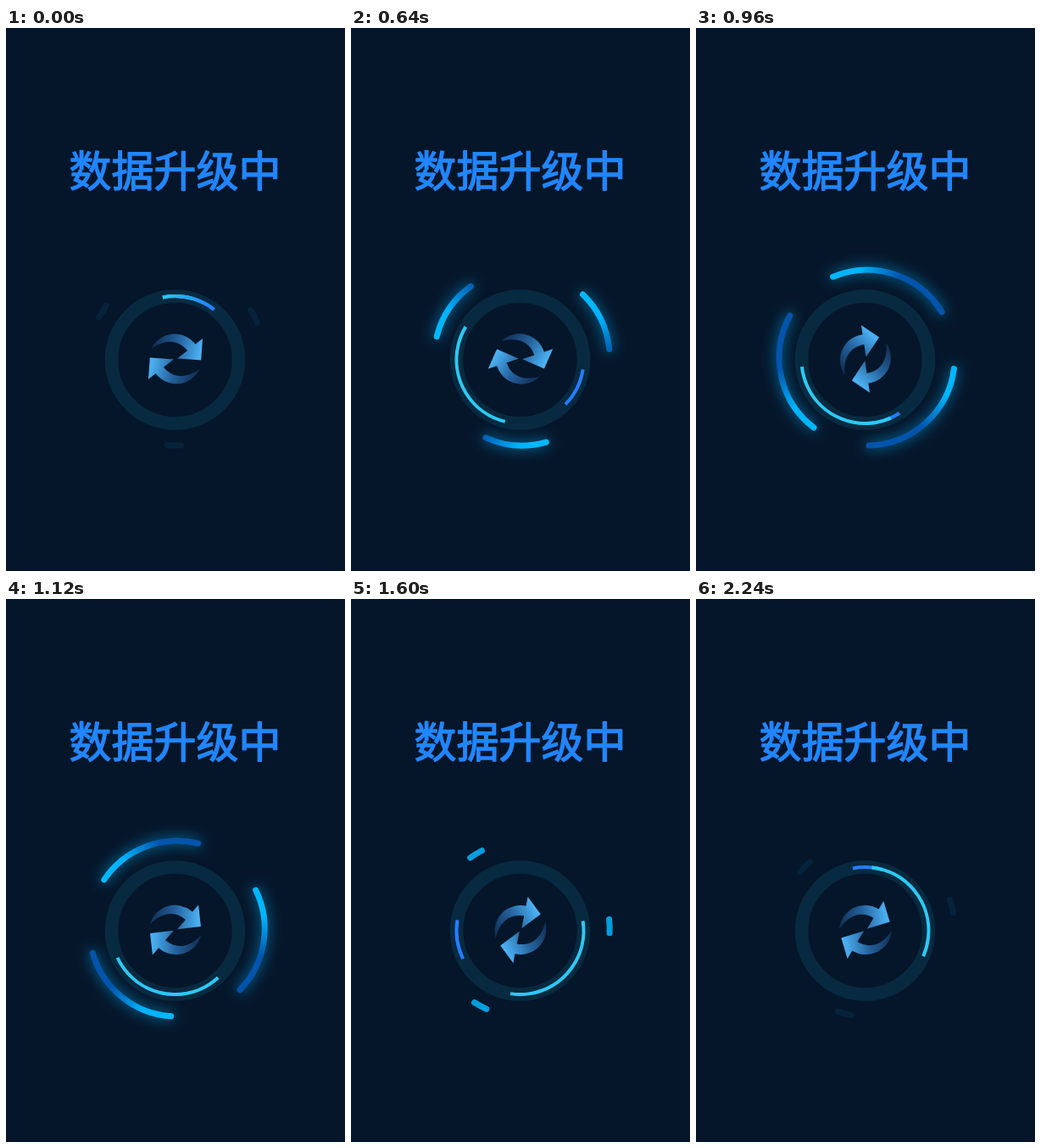
Write an HTML page with a canvas that moves like this. It is 400 px wide and 640 px high and loops after 2.32 s.

```html
<!DOCTYPE html>
<html lang="zh-CN">
<head>
<meta charset="utf-8">
<title>数据升级中</title>
<style>
html, body { margin: 0; width: 100%; height: 100%; overflow: hidden; background: #05162a; }
canvas { display: block; }
</style>
</head>
<body>
<canvas id="stage" width="400" height="640"></canvas>
<script>
const ctx = document.getElementById('stage').getContext('2d');
const LOOP = 2320, STEP = 80, SEAM = -11.2;
const CYAN = '#2cc9f4', BLUE = '#237eff';
const rad = deg => deg * Math.PI / 180;
const clamp = (v, lo = 0, hi = 1) => Math.min(hi, Math.max(lo, v));

function at(x, y, draw) {
  ctx.save();
  ctx.translate(x, y);
  draw();
  ctx.restore();
}

function withStops(gradient, stops) {
  stops.forEach(s => gradient.addColorStop(...s));
  return gradient;
}

// Angles are in degrees, clockwise from the top.
function arc(radius, start, length, width, color, cap = 'butt') {
  ctx.beginPath();
  ctx.arc(0, 0, radius, rad(start - 90), rad(start + length - 90));
  ctx.lineWidth = width;
  ctx.lineCap = cap;
  ctx.strokeStyle = color;
  ctx.stroke();
}

// An arc that crosses the seam keeps only the part after it.
function seamArc(start, length, color) {
  let from = ((start - SEAM) % 360 + 360) % 360;
  if (from + length > 360) {
    length += from - 360;
    from = 0;
  }
  arc(75, SEAM + from, length, 4, color);
}

function title() {
  ctx.font = '400 50px "Noto Sans CJK SC", "Noto Sans CJK", sans-serif';
  ctx.textAlign = 'center';
  ctx.fillStyle = ctx.strokeStyle = '#2186ff';
  ctx.lineWidth = 1.4;
  ctx.lineJoin = 'round';
  ctx.fillText('数据升级中', 199.6, 187.2);
  ctx.strokeText('数据升级中', 199.6, 187.2);
}

function ring(t) {
  const blue = 2.1 + t * 0.1511, span = 35.8;
  arc(75, 0, 360, 15.6, '#072a40');
  seamArc(blue, span, BLUE);
  seamArc(-91.3 - t * 0.1172, 107.5, CYAN);
  // The two colours start out blended.
  ctx.globalAlpha = clamp(1 - t / 160);
  const blend = ctx.createLinearGradient(-14, 0, 46, 0);
  arc(75, SEAM, blue + span - SEAM, 4, withStops(blend, [[0, '#22cdf2'], [1, BLUE]]));
}

function orbit(t) {
  const head = 57.3 - t * 0.2084;
  const grow = clamp(1 - Math.abs(t - 996) / 602);
  const length = 9 + 77 * grow;
  const fadeIn = 0.08 + 0.92 * clamp(t / 310);
  const fadeOut = 1 - 0.92 * clamp((t - 1500) / 600);
  ctx.globalAlpha = Math.min(fadeIn, fadeOut);
  ctx.shadowColor = `rgba(0, 170, 240, ${0.75 * clamp(grow * 2.5)})`;
  ctx.shadowBlur = 16;
  for (let i = 0; i < 3; i++) {
    const start = head + i * 120;
    const fill = withStops(ctx.createConicGradient(rad(start - 90), 0, 0),
      [[0, '#00b8ff'], [0.05, '#00b4fc'], [0.125, '#0354ac'],
       [0.5, '#0354ac'], [0.7, '#00b8ff'], [1, '#00b8ff']]);
    arc(103.5, start, length, 7, fill, 'round');
  }
}

const arrow = new Path2D('M-15-27A30.5 30.5 0 0 1 29 1L40 1L22.8 19.8L2 1H17C17-15 6-26-15-27Z');

function icon(t) {
  const fill = ctx.createLinearGradient(-12, -28, 22, 16);
  ctx.fillStyle = withStops(fill, [[0, '#112f55'], [0.5, '#24619c'], [1, '#4bb0f2']]);
  ctx.rotate(rad(-38.2 + t * 0.312));
  for (let i = 0; i < 2; i++) {
    ctx.fill(arrow);
    ctx.rotate(Math.PI);
  }
}

function frame(now) {
  const t = Math.floor(now % LOOP / STEP) * STEP;
  ctx.fillStyle = '#05162a';
  ctx.fillRect(0, 0, 400, 640);
  title();
  at(199.5, 391, () => ring(t));
  at(201.7, 388.6, () => orbit(t));
  at(200, 390, () => icon(t));
  requestAnimationFrame(frame);
}
requestAnimationFrame(frame);
</script>
</body>
</html>
```
